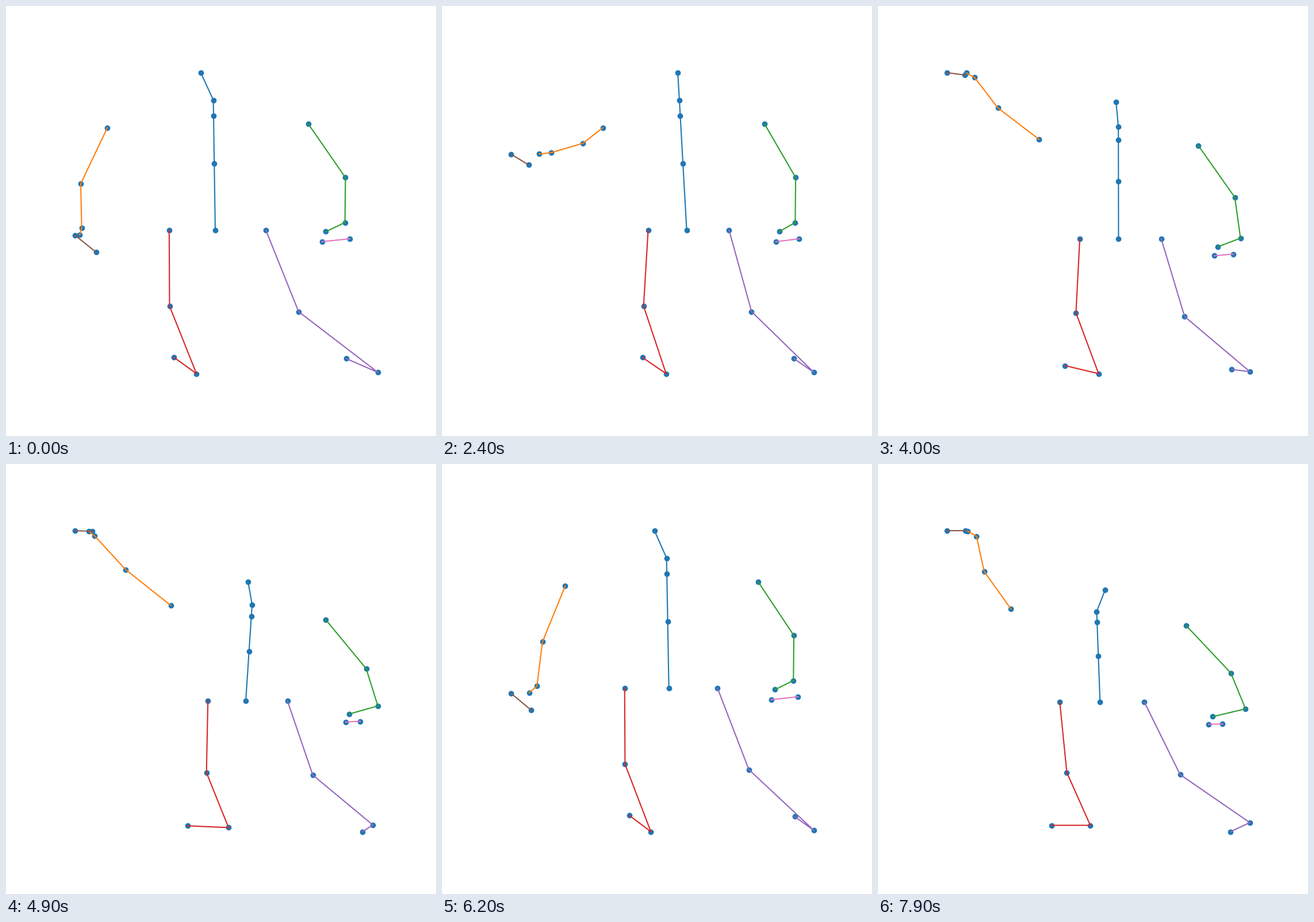
A matplotlib script that plays this animation: 748x748 px, repeating every 8 s.

```python
import matplotlib.pyplot as plt
import numpy as np
from matplotlib.animation import FuncAnimation

FRAMES, INTERVAL = 80, 100

# Key times and what drives the body at each of them.
# Units: hip width across, torso length up, pelvis at the origin.
KEYS = np.array([0, 12, 24, 32, 49, 62, 79])
DRIVERS = np.array([
    (0, 0, 0, 0.03, 0.85, 0, 1),                          # crouch
    (0, 0.3, 0.8, 1, 1.2, 0, 0),                          # lean of the legs
    (-0.02, -0.05, -0.09, -0.08, 0.08, -0.025, -0.04),    # neck x
    (-0.13, -0.09, -0.02, -0.02, -0.05, -0.13, 0.1),      # head x from the neck
    (-90, -60, -16, 12, 60, -90, 75),                     # arm lift in degrees
    (-1.39, -1.28, -1.28, -1.43, -1.51, -1.36, -1.37),    # raised elbow x
    (-1.38, -1.55, -1.67, -1.66, -1.9, -1.42, -1.46),     # raised wrist x
    (0.07, 0.46, 0.5, 0.45, 0.25, 0.28, 0.35),            # finger reach
    (1.68, 1.5, 1.57, 1.62, 1.6, 1.56, 1.77),             # outer ankle x
]).T


def joints(*rows):
    """Rows of standing x, y and crouching x, y."""
    rows = np.array(rows)
    return rows[:, :2], rows[:, 2:]


SHOULDER = joints((-1.115, 0.787, -1.054, 1.029))
RIGHT_ARM = joints((0.96, 0.818, 1.014, 0.849), (1.345, 0.405, 1.546, 0.321),
                   (1.34, 0.06, 1.719, -0.074), (1.143, -0.01, 1.332, -0.16))
RIGHT_HAND = joints((1.102, -0.087, 1.285, -0.245), (1.39, -0.065, 1.447, -0.24))
LEFT_LEG = joints((-0.476, 0, -0.476, 0), (-0.472, -0.582, -0.393, -0.777),
                  (-0.194, -1.1, -0.115, -1.36), (-0.425, -0.976, -0.576, -1.36))
RIGHT_LEG = joints((0.524, 0, 0.524, 0), (0.861, -0.624, 0.946, -0.8),
                   (0, -1.09, 0, -1.33), (1.355, -0.985, 1.542, -1.43))

# Monotone cubic slopes, so no driver overshoots its keys.
span = np.diff(KEYS)
rate = np.diff(DRIVERS, axis=0) / span[:, None]
a, b = rate[:-1], rate[1:]
same = a * b > 0
inner = np.where(same, 2 * a * b / np.where(same, a + b, 1), 0)
slopes = np.concatenate([rate[:1], inner, rate[-1:]])


def drivers_at(t):
    k = min(np.searchsorted(KEYS, t, side="right") - 1, len(span) - 1)
    h = span[k]
    u = (t - KEYS[k]) / h
    s = u * u * (3 - 2 * u)
    return (DRIVERS[k] * (1 - s) + DRIVERS[k + 1] * s
            + h * u * (1 - u) * ((1 - u) * slopes[k] - u * slopes[k + 1]))


def skeleton(t):
    """Limbs as arrays of points, in drawing order."""
    (crouch, lean, neck_x, head_dx, lift,
     elbow_x, wrist_x, reach, ankle_x) = drivers_at(t)

    def bend(limb):
        return limb[0] + crouch * (limb[1] - limb[0])

    # The inner spine joints lie on the line from neck to pelvis.
    neck = np.array([neck_x, 1])
    head = neck + (head_dx, 0.21 + 0.03 * crouch)
    spine = np.array([head, *(neck * f for f in (1, 0.881, 0.511, 0))])

    # The arm turns about the shoulder, the hand follows the forearm.
    rise = np.sin(np.radians(lift))
    fore = 0.37 * rise + 0.03
    shoulder = bend(SHOULDER)[0] + (0.1 * lean, 0)
    elbow = np.array([elbow_x, shoulder[1] + 0.43 * rise])
    wrist = np.array([wrist_x, elbow[1] + fore])
    palm = wrist + (-0.3 * reach, 0.15 * fore)
    tip = wrist + (-reach, 0.16 * fore)
    thumb = tip + (0.22, 0.18 * fore - 0.07)

    left_leg, right_leg = bend(LEFT_LEG), bend(RIGHT_LEG)
    left_leg[:, 0] -= 0.075 * lean * np.array([0, 1, 1, 2])
    right_leg[:, 0] -= 0.075 * lean * np.array([0, 1, 0, 0.5])
    right_leg[2, 0] = ankle_x

    return [spine, np.array([shoulder, elbow, wrist, palm]), bend(RIGHT_ARM),
            left_leg, right_leg, np.array([tip, thumb]), bend(RIGHT_HAND)]


fig, ax = plt.subplots(figsize=(7.48, 7.48), dpi=100)
ax.axis("off")
limbs = skeleton(0)
dots = ax.scatter(*np.concatenate(limbs).T, color="tab:blue")
lines = [ax.plot(*limb.T, color=f"C{i}")[0] for i, limb in enumerate(limbs)]


def update(frame):
    limbs = skeleton(frame)
    dots.set_offsets(np.concatenate(limbs))
    for line, limb in zip(lines, limbs):
        line.set_data(*limb.T)
    # The view always fits the figure.
    ax.relim()
    ax.autoscale_view()
    return [dots, *lines]


anim = FuncAnimation(fig, update, frames=FRAMES, interval=INTERVAL,
                     repeat=True, repeat_delay=0)
plt.show()
```
